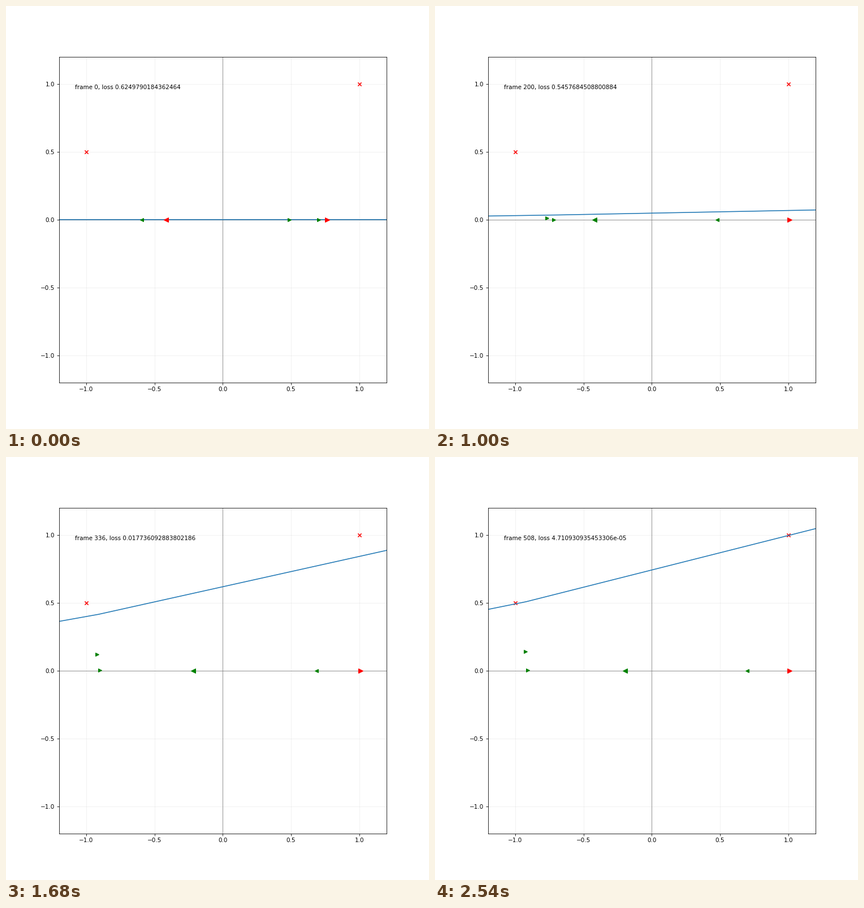
A matplotlib script that plays this animation: 748x748 px, repeating every 2560 ms.

```python
import numpy as np
import matplotlib.pyplot as plt
from matplotlib.animation import FuncAnimation

FRAMES, STRIDE, LIM = 128, 4, 1.2
X = np.array([-1.0, 1.0])
Y = np.array([0.5, 1.0])

# Visible ReLU units: start kink and output strength; each faces outwards.
KINKS = np.array([0.703, 0.487, -0.593, 0.765, -0.4155])
OUTPUTS = np.array([0.765, 0.417, 1.214, -0.5, -0.251])
LEAD_SCALE, SCALE = 0.0104, 0.0015
FACING = np.sign(KINKS)


def learning_rate(step):
    """Constant, then a linear ramp down."""
    return 0.01 * np.clip((540 - step) / 190, 0, 1)


def initial(bulk):
    """Unit 0 stands for all units whose kinks lie outside the view."""
    scale = np.where(np.arange(len(KINKS)) == 0, LEAD_SCALE, SCALE)
    w = scale * np.sqrt(2) / (1 + abs(KINKS)) * FACING
    return np.r_[0, w], np.r_[0, -w * KINKS], np.r_[bulk, scale * OUTPUTS]


def train(bulk, steps):
    """Gradient descent on the mean squared error."""
    w, b, a = initial(bulk)
    states, losses = [], []
    for step in range(steps + 1):
        pre = np.outer(w, X) + b[:, None]
        active = (pre >= 0).astype(float)
        hidden = pre * active
        res = Y - a @ hidden
        states.append((w, b, a))
        losses.append(float(np.mean(res ** 2)))
        lr = learning_rate(step)
        w, b, a = (w + lr * a * (active @ (res * X)),
                   b + lr * a * (active @ res),
                   a + lr * (hidden @ res))
    return states, losses


def calibrate(step, loss, lo=0.008, hi=0.04):
    """Bisect for the bulk scale that reaches a loss at a step."""
    for _ in range(40):
        mid = (lo + hi) / 2
        if train(mid, step)[1][-1] > loss:
            lo = mid
        else:
            hi = mid
    return mid


states, losses = train(calibrate(288, 0.1427766), (FRAMES - 1) * STRIDE)

fig, ax = plt.subplots(figsize=(10, 10), dpi=74.8)
ax.set(xlim=(-LIM, LIM), ylim=(-LIM, LIM))
ticks = np.arange(-1, 1.1, 0.5)
ax.set_xticks(ticks)
ax.set_yticks(ticks)
ax.grid(alpha=0.2)
ax.axhline(0, color="gray", lw=0.8)
ax.axvline(0, color="gray", lw=0.8)
ax.scatter(X, Y, marker="x", color="red")

xs = np.linspace(-LIM, LIM, 241)
curve, = ax.plot(xs, 0 * xs, color="C0", lw=1.5)
label = ax.text(-0.9 * LIM, 0.8 * LIM, "")
markers = [ax.plot([], [], ">" if d > 0 else "<", ms=7 if out < 0 else 6,
                   zorder=3)[0]
           for d, out in zip(FACING, OUTPUTS)]


def update(i):
    step = i * STRIDE
    w, b, a = states[step]
    curve.set_ydata(a @ np.maximum(np.outer(w, xs) + b[:, None], 0))
    for k, marker in enumerate(markers, start=1):
        norm = w[k] ** 2 + b[k] ** 2 + a[k] ** 2
        marker.set_data([-b[k] / w[k]], [norm])
        marker.set_color("green" if a[k] > 0 else "red")
    label.set_text(f"frame {step}, loss {losses[step]}")
    return [curve, label, *markers]


anim = FuncAnimation(fig, update, frames=FRAMES, interval=20, repeat=True,
                     repeat_delay=0, init_func=lambda: update(0))
plt.show()
```
